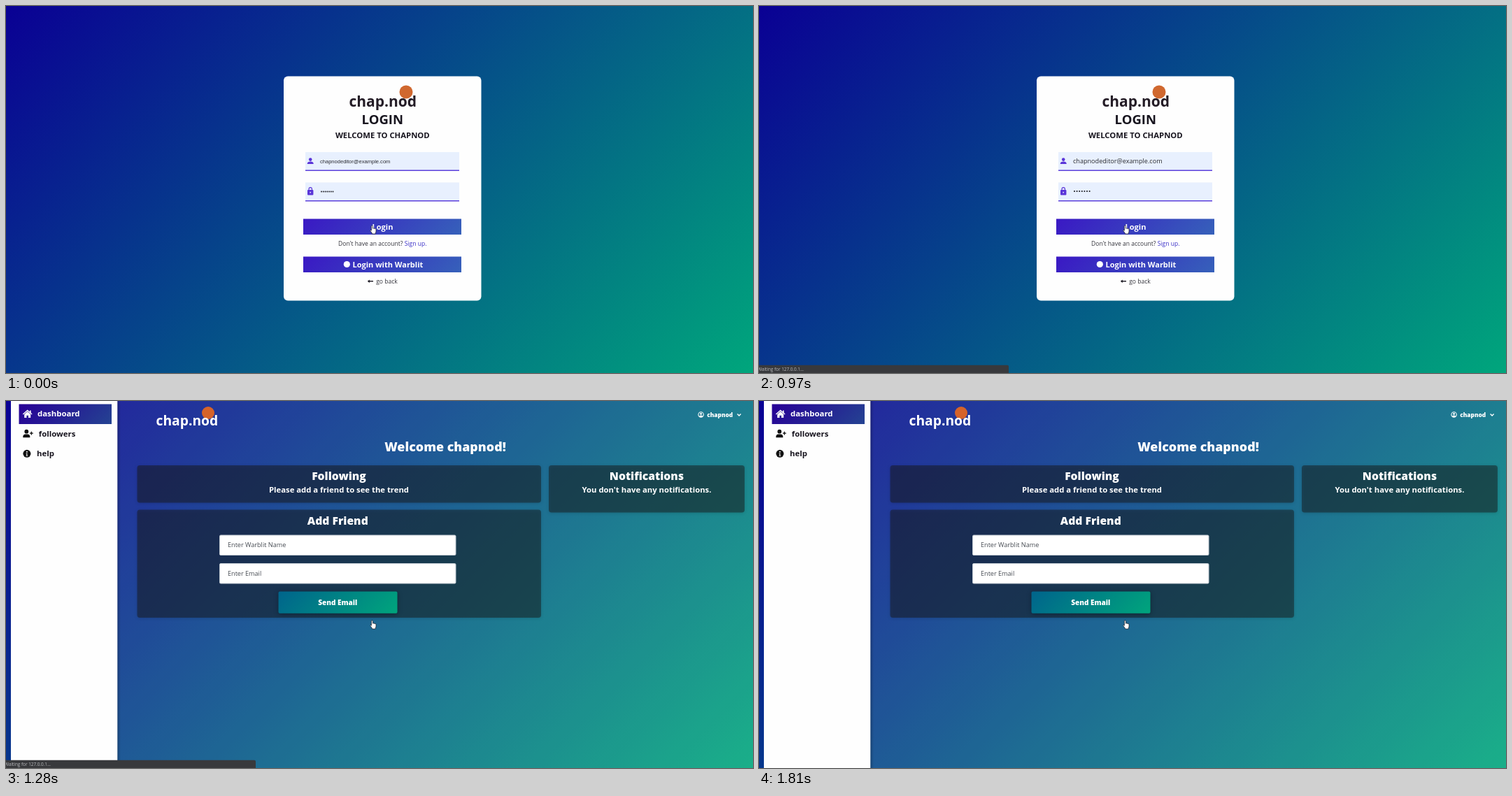
These frames come from a looping animation (1068 px wide and 525 px high, 2.36 s). An HTML page:

```html
<!DOCTYPE html>
<html lang="en">
<head>
<meta charset="utf-8">
<title>Login to dashboard</title>
<style>
html, body { margin: 0; width: 100%; height: 100%; overflow: hidden; background: #fff; }
svg.stage { display: block; width: 1068px; height: 525px; }
text { font-family: "Open Sans", "Noto Sans", sans-serif; white-space: pre; }
.mid { text-anchor: middle; }
.bold { font-weight: 700; }

/* Login card */
.ink { fill: #18151f; }
.btn { font-size: 11px; font-weight: 700; fill: #fff; }
.note { font-size: 8.55px; fill: #34343c; }
.entry { font-size: 9.1px; fill: #2a2b30; }
.entry.preview { font-family: "Liberation Sans", Arial, sans-serif; font-size: 7.55px; }
.dots { fill: none; stroke: #1c1c22; stroke-linecap: round; }

/* Dashboard */
.menu { font-size: 11.4px; font-weight: 700; }
.lead { font-size: 11.3px; font-weight: 700; fill: #fff; }
.hint { font-size: 9.1px; fill: #464b52; }
.panel { fill: rgba(24, 24, 24, .47); filter: drop-shadow(0 1px 2px rgba(0, 0, 0, .28)); }
.field { fill: #fff; stroke: #c3cbd3; }
.face { font-size: 10px; fill: #fff; font-weight: 800; }
.face text { font-family: inherit; }
.loaded { font-family: "Open Sans", "Noto Sans", sans-serif; }
.fallback { font-family: Inter, Roboto, sans-serif; font-size: 10.4px; font-weight: 900; }
.h1 { font-size: 1.785em; }
.h2 { font-size: 1.57em; }
.send { font-size: 1.005em; }
.user { font-size: .84em; }

/* Timeline: 2360 ms, hard cuts */
.preview, .typed, .press, .status, .dash, .early, .late {
  animation: 2.36s step-end infinite;
}
.preview { animation-name: preview; }
.typed { animation-name: typed; }
.press { animation-name: press; }
.status { animation-name: status; }
.dash { animation-name: dash; }
.early { animation-name: early; }
.late { animation-name: late; }
@keyframes preview { 0% { opacity: 1 } 33.898%, 100% { opacity: 0 } }
@keyframes typed { 0% { opacity: 0 } 33.898%, 100% { opacity: 1 } }
@keyframes press { 0% { opacity: 0 } 33.898% { opacity: 1 } 37.288%, 100% { opacity: 0 } }
@keyframes status {
  0% { opacity: 0 } 37.288% { opacity: .5 } 41.102% { opacity: 1 }
  70.339% { opacity: .65 } 73.729% { opacity: .25 } 76.695%, 100% { opacity: 0 }
}
@keyframes dash { 0% { opacity: 0 } 50.847%, 100% { opacity: 1 } }
@keyframes early { 0% { opacity: 1 } 54.237%, 100% { opacity: 0 } }
@keyframes late { 0% { opacity: 0 } 54.237%, 100% { opacity: 1 } }
</style>
</head>
<body>
<svg class="stage" viewBox="0 0 1068 525" xmlns="http://www.w3.org/2000/svg">
  <defs>
    <linearGradient id="sky" gradientUnits="userSpaceOnUse" x1="135.75" y1="-135.75" x2="932.25" y2="660.75">
      <stop stop-color="#0a0094"/><stop offset="1" stop-color="#00a67c"/>
    </linearGradient>
    <linearGradient id="violet" gradientUnits="userSpaceOnUse" x1="51" y1="-51" x2="175" y2="73">
      <stop stop-color="#3a18c4"/><stop offset="1" stop-color="#3661ba"/>
    </linearGradient>
    <linearGradient id="active" gradientUnits="userSpaceOnUse" x1="45" y1="-21" x2="125" y2="59">
      <stop stop-color="#270096"/><stop offset="1" stop-color="#244392"/>
    </linearGradient>
    <linearGradient id="teal" gradientUnits="userSpaceOnUse" x1="424" y1="238" x2="525" y2="339">
      <stop stop-color="#00648c"/><stop offset="1" stop-color="#00a57c"/>
    </linearGradient>
    <linearGradient id="edge">
      <stop stop-color="#000" stop-opacity=".25"/><stop offset="1" stop-color="#000" stop-opacity="0"/>
    </linearGradient>
    <clipPath id="half"><rect x="190" width="140" height="26.5"/></clipPath>
    <g id="brand">
      <circle cx="289" cy="17" r="9" fill="#d5632a"/>
      <text class="bold" x="214.5" y="35" font-size="19.3">chap.nod</text>
    </g>
    <g id="heads">
      <text class="mid h1" x="628" y="72">Welcome chapnod!</text>
      <text class="mid h2" x="476" y="112.5">Following</text>
      <text class="mid h2" x="474.3" y="176.5">Add Friend</text>
      <text class="mid h2" x="916" y="112.5">Notifications</text>
      <text class="mid send" x="474.3" y="291.5">Send Email</text>
    </g>
  </defs>

  <rect width="1068" height="525" fill="url(#sky)"/>

  <g class="login">
    <rect x="397" y="100.5" width="282.5" height="321" rx="6" fill="#fefefe"/>
    <circle cx="572" cy="123" r="9.5" fill="#d0682f"/>
    <text class="bold" x="490.5" y="143.5" font-size="21" fill="#241c26">chap.nod</text>
    <text class="mid bold ink" x="538.3" y="169" font-size="18.5">LOGIN</text>
    <text class="mid bold ink" x="538.3" y="189.2" font-size="11.3">WELCOME TO CHAPNOD</text>

    <g fill="#e8f0fe">
      <rect x="428" y="209" width="220" height="26.5"/>
      <rect x="428" y="252.5" width="220" height="26.5"/>
    </g>
    <path d="M428 235.3h220M428 278.7h220" stroke="#5b3fdc" stroke-width="1.4"/>
    <g fill="#5a35d8">
      <circle cx="435.2" cy="219.6" r="2.3"/>
      <path d="M430.8 226v-1c0-1.700 2.800-2.500 4.400-2.500s4.400.8 4.400 2.500v1z"/>
      <rect x="431" y="263" width="8.400" height="7.400" rx="1"/>
      <path d="M433 263.500v-1.700a2.200 2.200 0 0 1 4.400 0v1.700" fill="none" stroke="#5a35d8" stroke-width="1.100"/>
      <circle cx="435.200" cy="266.700" r=".9" fill="#e8f0fe"/>
    </g>
    <text class="entry preview" x="449" y="225">chapnodeditor@example.com</text>
    <text class="entry typed" x="449" y="224.800">chapnodeditor@example.com</text>
    <path class="dots preview" d="M451 265.500h17" stroke-width="1.900" stroke-dasharray="0 2.750"/>
    <path class="dots typed" d="M451 265h22" stroke-width="2.100" stroke-dasharray="0 3.600"/>

    <rect width="226" height="22.500" fill="url(#violet)" transform="translate(425 304.500)"/>
    <text class="mid btn" x="538.500" y="319.700">Login</text>
    <text class="note" x="475" y="343">Don't have an account? <tspan fill="#3a30c8">Sign up.</tspan></text>
    <rect width="226" height="22.500" fill="url(#violet)" transform="translate(425 358.500)"/>
    <circle cx="487.300" cy="369.500" r="4.600" fill="#fff"/>
    <text class="btn" x="495.500" y="373.500" font-size="10.850">Login with Warblit</text>
    <path d="M525 393.700h-6" stroke="#18151f" stroke-width="1.400"/>
    <path d="M516.800 393.700l3-2.200v4.400z" class="ink"/>
    <text class="note" x="529.200" y="396.700">go back</text>
  </g>

  <g class="dash">
    <rect width="1068" height="525" fill="url(#sky)"/>
    <rect x="159" width="909" height="525" fill="#fff" opacity=".1"/>
    <rect x="159" width="5" height="525" fill="url(#edge)"/>
    <rect x="7" width="152.300" height="525" fill="#fefefe"/>
    <rect x="18.500" y="4.500" width="132.500" height="28.500" fill="url(#active)"/>

    <rect class="panel" x="187.500" y="92" width="577.500" height="53.500" rx="4"/>
    <rect class="panel" x="187.500" y="155.500" width="577.500" height="154.500" rx="4"/>
    <rect class="panel" x="776" y="92" width="280" height="67.500" rx="4"/>
    <text class="mid lead" x="476" y="131">Please add a friend to see the trend</text>
    <text class="mid lead" x="916" y="131">You don't have any notifications.</text>
    <rect class="field" x="305.500" y="192" width="337.500" height="28.500" rx="1.500"/>
    <rect class="field" x="305.500" y="232.500" width="337.500" height="28.500" rx="1.500"/>
    <text class="hint" x="317" y="209.200">Enter Warblit Name</text>
    <text class="hint" x="317" y="249.800">Enter Email</text>
    <rect x="389.500" y="272.500" width="170" height="31.300" rx="2" fill="url(#teal)"
      style="filter: drop-shadow(0 1px 3px rgba(0, 0, 0, .35))"/>

    <g class="early">
      <g class="face" clip-path="url(#half)"><use href="#brand" class="loaded"/></g>
      <g class="face fallback">
        <use href="#heads"/>
        <text class="user" x="1005.300" y="22">chapnod</text>
      </g>
      <g class="menu">
        <text x="29.500" y="22.300" fill="#fff">dashboard</text>
        <text x="29.500" y="50.700" class="ink">followers</text>
        <text x="29.500" y="79" class="ink">help</text>
      </g>
    </g>

    <g class="late">
      <g class="face loaded">
        <use href="#brand"/>
        <use href="#heads"/>
        <text class="user" x="1002.200" y="22.700">chapnod</text>
      </g>
      <circle cx="993.600" cy="19.500" r="3.700" fill="none" stroke="#fff" stroke-width="1.100"/>
      <circle cx="993.600" cy="18.400" r="1.400" fill="#fff"/>
      <path d="M991 21.700q2.600-2.400 5.200 0l-1 1.200h-3.200z" fill="#fff"/>
      <path d="M1045.600 18.400l2.500 2.500 2.500-2.500" fill="none" stroke="#fff" stroke-width="1.400"/>
      <g class="menu">
        <text x="45" y="22.300" fill="#fff">dashboard</text>
        <text x="46.800" y="50.700" class="ink">followers</text>
        <text x="44" y="79" class="ink">help</text>
      </g>
      <g fill="#fff">
        <path d="M24.300 19l6.400-5.600 6.400 5.600" fill="none" stroke="#fff" stroke-width="1.400"/>
        <path d="M34 13.500h1.600v4L34 16z"/>
        <path d="M26.200 19l4.500-3.900 4.500 3.900v4.900h-3.200v-3.200h-2.600v3.200h-3.200z"/>
      </g>
      <g fill="#111">
        <circle cx="29.300" cy="43.700" r="2.900"/>
        <path d="M24.300 52.300v-1.500c0-2 1.500-3.300 3.300-3.300h3.400c1.800 0 3.300 1.300 3.300 3.300v1.500z"/>
        <path d="M36.400 43.700v4.800M34 46.100h4.800" stroke="#111" stroke-width="1.400"/>
        <circle cx="29.900" cy="75.300" r="5.500"/>
      </g>
      <circle cx="29.900" cy="72.700" r="1" fill="#fff"/>
      <path d="M28.600 74.700h1.800v3.200h.8v.9h-2.600v-.9h.7v-2.300h-.7z" fill="#fff"/>
    </g>
  </g>

  <g class="status">
    <path d="M0 513.700h355q2 0 2 2v9.300h-357z" fill="#38393c"/>
    <text x="-1.800" y="522" font-size="6.350" fill="#b9babd">Waiting for 127.0.0.1...</text>
  </g>

  <circle class="press" cx="523" cy="314.200" r="6.800" fill="#dcd732" opacity="0" fill-opacity=".7"/>
  <path d="M522.400 321.300v-6.200c0-1.500 2-1.500 2 0v3.200c.3-.7 1.500-.6 1.700.2.400-.6 1.500-.4 1.600.4.500-.4 1.300-.1 1.300.7v2.700c0 1.500-.8 2-.9 3.700h-4.500c-.2-1.500-1.700-2.800-2.700-4.500-.5-1 .7-1.600 1.500-.2z"
    fill="#fff" stroke="#1b1b22" stroke-width=".7" stroke-linejoin="round"/>
</svg>
</body>
</html>
```
